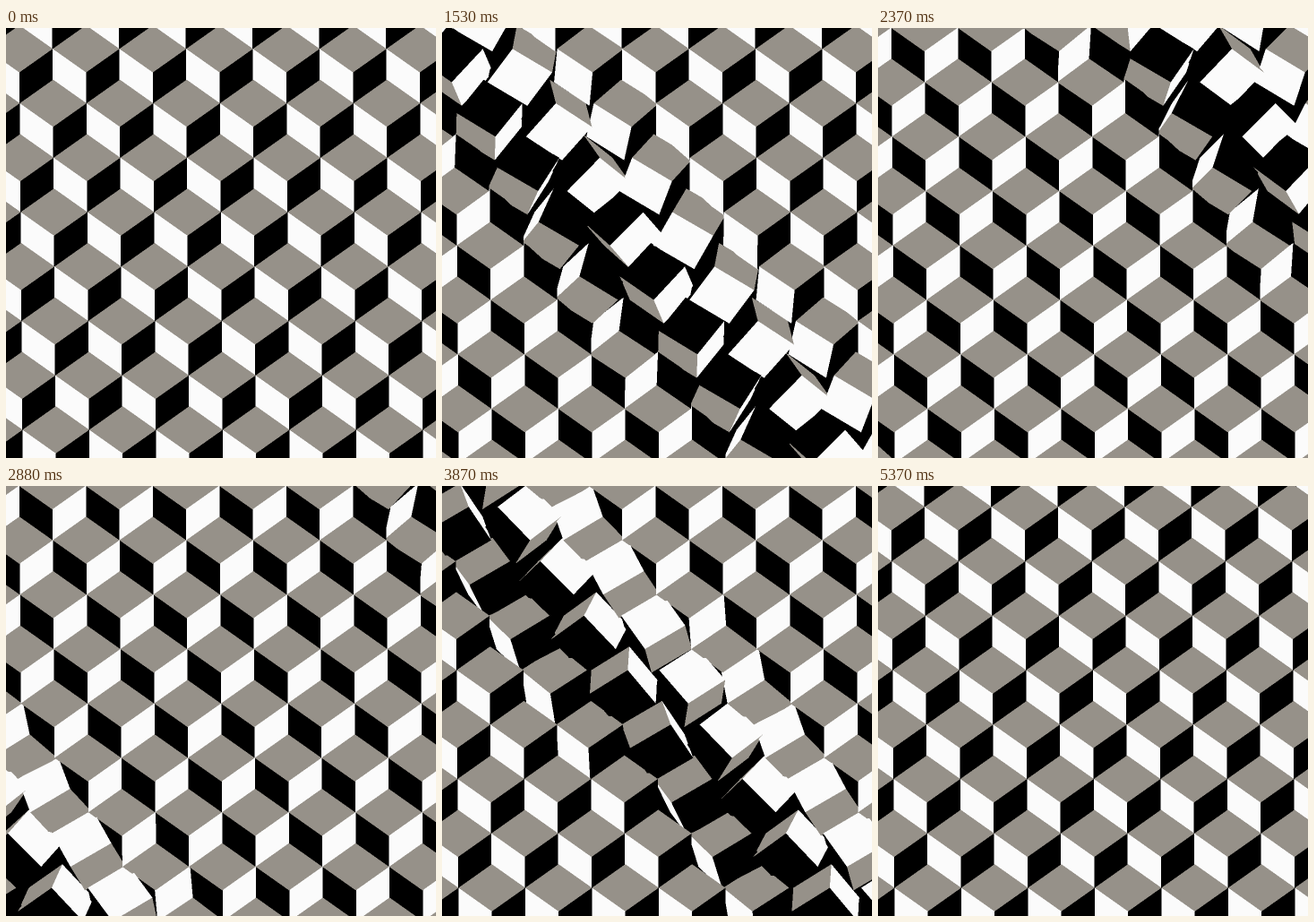
An HTML page with a canvas for the animation above (5400 ms loop, 480 px wide and 480 px high).

```html
<!DOCTYPE html>
<html lang="en">
<head>
<meta charset="utf-8">
<title>Turning cubes</title>
<style>
  html, body { margin: 0; width: 100%; height: 100%; overflow: hidden; background: #000; }
  canvas { display: block; width: 480px; height: 480px; }
</style>
</head>
<body>
<canvas id="stage" width="480" height="480"></canvas>
<script>
const SIZE = 480, SS = 2, N = SIZE * SS;
const LOOP = 5400, TICK = 30;
const COL = 74.5, ROW = 60.75, SHEAR = 0.5;   // lattice
const HALF = COL / 2 / Math.SQRT2;            // half a cube edge
const TURN = 800;                             // length of a half turn
const SECOND = 2255;                          // second wave follows the first

const ctx = document.getElementById('stage').getContext('2d');
const buffer = document.createElement('canvas');
buffer.width = buffer.height = N;
const bctx = buffer.getContext('2d');
const image = bctx.createImageData(N, N);
const pixels = new Uint32Array(image.data.buffer);
const depth = new Float32Array(N * N);

const rgb = (r, g, b) => (255 << 24 | b << 16 | g << 8 | r) >>> 0;
const BLACK = rgb(0, 0, 0);
const COLORS = [rgb(251, 251, 251), BLACK, rgb(150, 145, 137)];

// Cube axes at rest: x right, y down, z towards the viewer
const R = Math.SQRT1_2;
const AXES = [[-R, 0.5, 0.5], [R, 0.5, 0.5], [0, -R, R]];

const cubes = [];
for (let r = -3; r <= 8; r++) {
  for (let c = -2; c <= 7; c++) {
    const step = c + (r & 1) / 2;
    cubes.push({
      x: 52.65 + step * COL + r * SHEAR,
      y: 102.65 + r * ROW,
      mid: 1515 + (step - 2) * 190 - (r - 2) * 142.5
    });
  }
}

function ease(p) {
  p = Math.min(1, Math.max(0, p));
  return p * p * (3 - 2 * p);
}

function angle(t, mid) {
  const start = mid - TURN / 2;
  const local = ((t - start) % LOOP + LOOP) % LOOP;
  return Math.PI * (ease(local / TURN) + ease((local - SECOND) / TURN));
}

// Depth-tested parallelogram around (cx, cy, cz) spanned by ±a and ±b
function fillFace(cx, cy, cz, a, b, n, color) {
  const det = a[0] * b[1] - a[1] * b[0];
  if (Math.abs(det) < 1e-3) return;
  const ry = Math.abs(a[1]) + Math.abs(b[1]);
  const y0 = Math.max(0, Math.ceil(cy - ry - 0.5));
  const y1 = Math.min(N - 1, Math.floor(cy + ry - 0.5));
  const limit = Math.abs(det) * 1.00001;
  const slope = -n[0] / n[2];
  for (let y = y0; y <= y1; y++) {
    const dy = y + 0.5 - cy;
    let lo = -1e4, hi = 1e4;
    for (const e of [a, b]) {
      if (Math.abs(e[1]) < 1e-6) {
        if (Math.abs(dy * e[0]) > limit) hi = -1e5;
        continue;
      }
      const mid = dy * e[0] / e[1], w = limit / Math.abs(e[1]);
      lo = Math.max(lo, mid - w);
      hi = Math.min(hi, mid + w);
    }
    const x0 = Math.max(0, Math.ceil(cx + lo - 0.5));
    const x1 = Math.min(N - 1, Math.floor(cx + hi - 0.5));
    let z = cz - n[1] / n[2] * dy + slope * (x0 + 0.5 - cx);
    for (let x = x0, i = y * N + x0; x <= x1; x++, i++, z += slope) {
      if (z > depth[i]) {
        depth[i] = z;
        pixels[i] = color;
      }
    }
  }
}

function drawCube(cube, t) {
  const phi = angle(t, cube.mid), cos = Math.cos(phi), sin = Math.sin(phi);
  const h = HALF * SS;
  const dirs = AXES.map(([x, y, z]) => [x * cos + z * sin, y, z * cos - x * sin]);
  const edges = dirs.map(d => d.map(v => v * h));
  for (let k = 0; k < 3; k++) {
    const n = dirs[k];
    if (Math.abs(n[2]) < 1e-3) continue;
    const s = Math.sign(n[2]), e = edges[k];
    fillFace(cube.x * SS + s * e[0], cube.y * SS + s * e[1], s * e[2],
             edges[(k + 1) % 3], edges[(k + 2) % 3], n, COLORS[k]);
  }
}

function draw(t) {
  pixels.fill(BLACK);
  depth.fill(-1e4);
  for (const cube of cubes) drawCube(cube, t);
  bctx.putImageData(image, 0, 0);
  ctx.drawImage(buffer, 0, 0, SIZE, SIZE);
}

const begin = performance.now();
let shown = -1;
function frame() {
  const now = Math.max(0, performance.now() - begin) % LOOP;
  const t = Math.floor(now / TICK) * TICK;
  if (t !== shown) draw(shown = t);
  requestAnimationFrame(frame);
}
frame();
</script>
</body>
</html>
```
